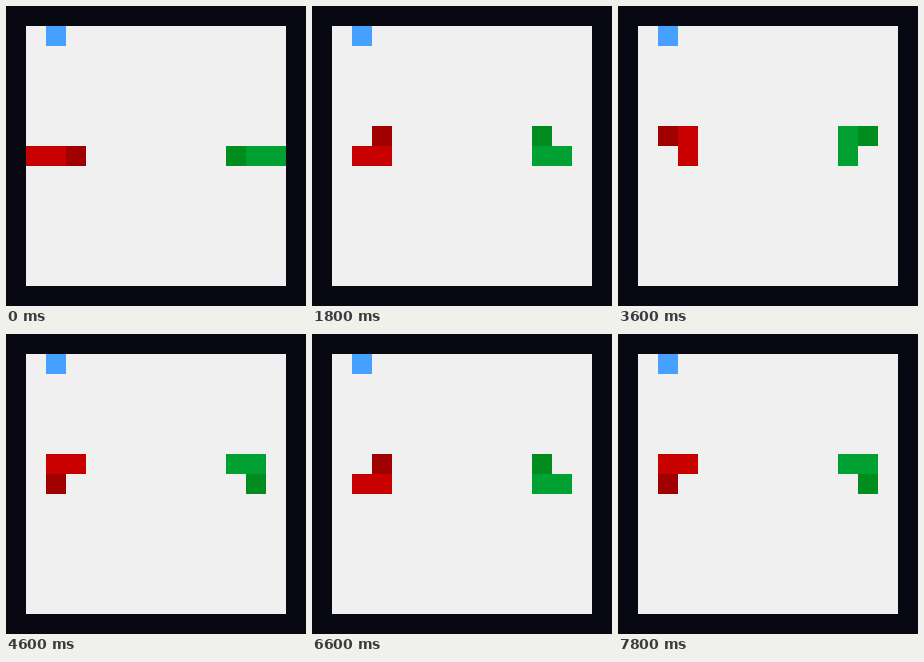
Recreate the animation shown at these times as an HTML page with a canvas. Size 300x300 px, loop 8000 ms.

```html
<!DOCTYPE html>
<html lang="en">
<head>
<meta charset="utf-8">
<title>Two snakes</title>
<style>
  html, body { margin: 0; width: 100%; height: 100%; overflow: hidden; background: #080812; }
  canvas { display: block; width: 300px; height: 300px; }
</style>
</head>
<body>
<canvas id="stage" width="300" height="300"></canvas>
<script>
const ctx = document.getElementById('stage').getContext('2d');
const CELL = 20, STEP_MS = 200, LOOP_MS = 8000, LENGTH = 3;

// Columns and rows of the square that both snakes circle, in the left snake's view
const circuit = [[3, 7], [3, 6], [2, 6], [2, 7]];

// Before the first step the snake lies straight, reaching in from the wall
const cellAt = step => step < 0 ? [3 + step, 7] : circuit[step % circuit.length];

function fillCell(col, row, color) {
  ctx.fillStyle = color;
  ctx.fillRect(col * CELL, row * CELL, CELL, CELL);
}

function drawSnake(step, headColor, bodyColor, mirrored) {
  for (let i = LENGTH - 1; i >= 0; i--) {
    const [col, row] = cellAt(step - i);
    fillCell(mirrored ? 14 - col : col, row, i ? bodyColor : headColor);
  }
}

function draw(now) {
  const step = Math.floor((now % LOOP_MS) / STEP_MS);
  ctx.fillStyle = '#080812';
  ctx.fillRect(0, 0, 300, 300);
  ctx.fillStyle = '#f0f0f0';
  ctx.fillRect(CELL, CELL, 260, 260);
  fillCell(2, 1, '#46a0ff');
  drawSnake(step, '#a00000', '#c80000', false);
  drawSnake(step, '#008c1e', '#00a032', true);
}

const start = performance.now();
function tick() {
  draw(performance.now() - start);
  requestAnimationFrame(tick);
}
tick();
</script>
</body>
</html>
```
